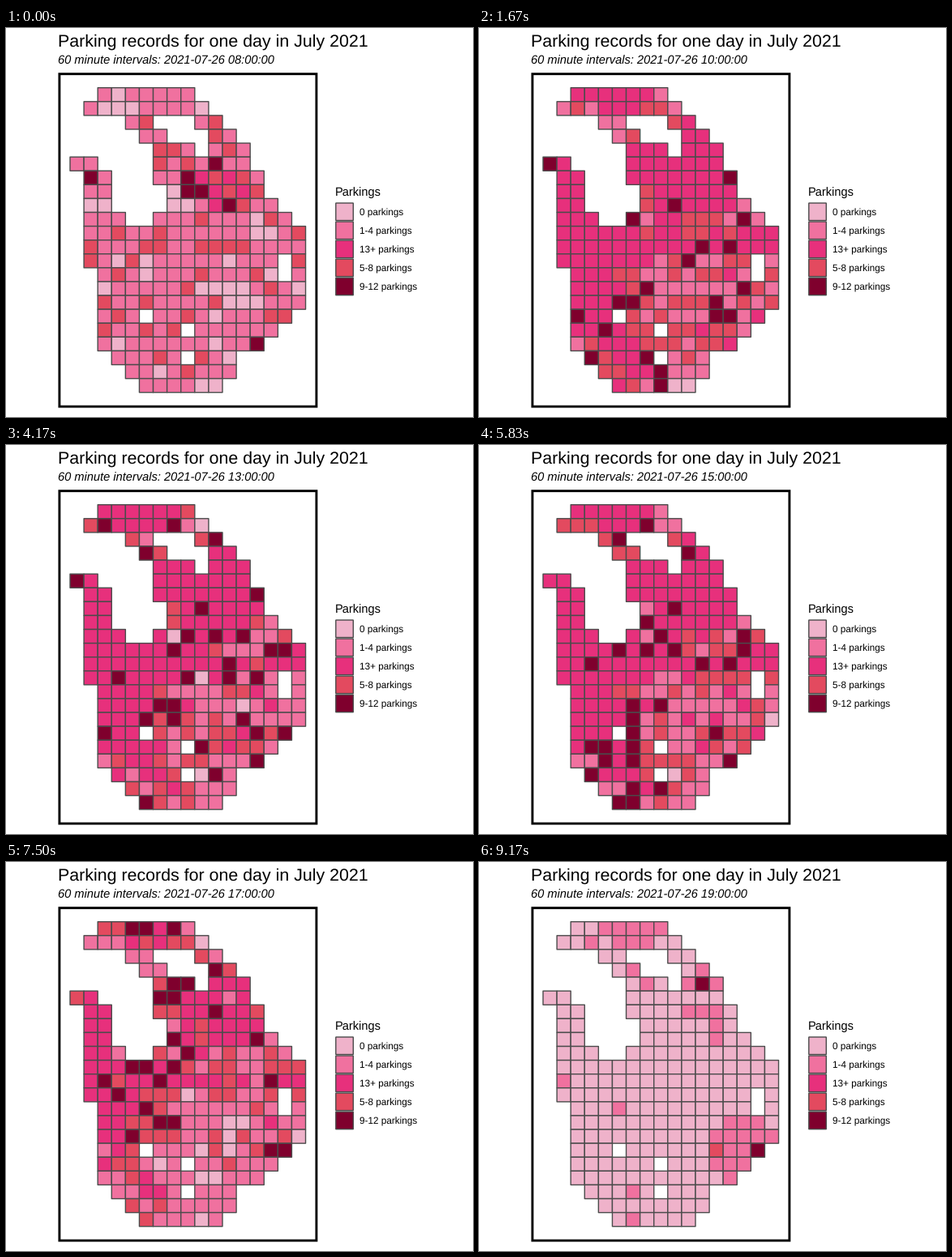
Animation, 576 px wide and 480 px high, one loop 10 s. Source, as a matplotlib script:

```python
import numpy as np
import matplotlib.pyplot as plt
from matplotlib.animation import FuncAnimation
from matplotlib.collections import PatchCollection
from matplotlib.patches import Rectangle

plt.rcParams["text.hinting"] = "none"

WIDTH, HEIGHT, DPI = 576, 480, 96
HOURS = range(8, 20)
FRAMES, INTERVAL = 200, 50

LEFT, TOP, CELL = 79.0, 73.7, 17.09
ROWS, COLS = 22, 17
EDGE = "#4b4b4b"

LIMITS = [1, 5, 9, 13]
COLORS = np.array(["#efb2ca", "#f0719f", "#e34a5f", "#7f002d", "#e7307c"])
LEGEND = [("0", 0), ("1-4", 1), ("13+", 4), ("5-8", 2), ("9-12", 3)]

# Corners (row, column) of the west and east outline.
WEST = [(0, 2), (1, 1), (2, 4), (4, 6), (5, 0), (6, 1), (12, 1), (13, 2),
        (18, 2), (21, 5)]
EAST = [(0, 8), (4, 12), (7, 13), (8, 14), (10, 16), (15, 16), (18, 13),
        (19, 11), (20, 11), (21, 10)]
# Water inside the outline: row, column, columns, rows.
WATER = [(2, 6, 3, 1), (3, 7, 3, 1), (4, 9, 1, 1), (5, 2, 4, 1), (6, 3, 3, 3),
         (7, 6, 1, 2), (9, 4, 2, 1), (12, 15, 1, 2), (16, 5, 1, 1),
         (17, 8, 1, 1), (19, 8, 1, 1)]

row, col = np.indices((ROWS, COLS))


def hotspot(r, c, height, width):
    """Flat-topped bump around a cell, falling off at the given half sizes."""
    distance = ((row - r) / height) ** 2 + ((col - c) / width) ** 2
    return np.exp(-distance ** 2)


# Expected parkings per cell at the start, middle and end of the day.
MORNING = 2.6 + 15 * hotspot(6.7, 10, 1.5, 2)
DAY = (5.5 + 45 * hotspot(9.5, 2.2, 6, 3.6) + 45 * hotspot(6, 10, 2.8, 3.6)
       + 30 * hotspot(0.5, 3.8, 1, 2.8) + 14 * hotspot(11, 8, 1.2, 3)
       + 18 * hotspot(11, 14.5, 1, 2.2) + 12 * hotspot(19, 5, 1.8, 1.8))
EVENING = (0.04 + 4 * hotspot(15.7, 14, 2, 2.2) + 2 * hotspot(0.4, 6, 1, 4)
           + 2 * hotspot(4, 11.5, 2.8, 1.4))
TEXTURE = np.exp(0.65 * np.random.default_rng(7).normal(size=(ROWS, COLS)))


def levels_at(hour):
    morning = np.interp(hour, [8, 9], [1, 0])
    day = np.interp(hour, [8, 9, 15, 19], [0, 1, 1, 0])
    evening = np.interp(hour, [15, 19], [0, 1])
    rate = morning * MORNING + day * DAY + evening * EVENING
    parkings = np.random.default_rng(hour).poisson(rate * TEXTURE)
    return np.digitize(parkings, LIMITS)


def outline(corners):
    return np.rint(np.interp(row, *zip(*corners)))


mask = (col >= outline(WEST)) & (col <= outline(EAST))
for r, c, columns, rows in WATER:
    mask[r:r + rows, c:c + columns] = False

fig = plt.figure(figsize=(WIDTH / DPI, HEIGHT / DPI), dpi=DPI,
                 facecolor="white")
ax = fig.add_axes([0, 0, 1, 1])
ax.set(xlim=(0, WIDTH), ylim=(HEIGHT, 0))
ax.axis("off")


def px(value):
    return value * 72 / DPI


def label(x, y, text, points, **style):
    return ax.text(x, y, text, fontsize=points, family="Liberation Sans",
                   color="black", va="baseline", **style)


label(64, 23, "Parking records for one day in July 2021", 16)
subtitle = label(64.3, 45.2, "", 11, style="italic")
ax.add_patch(Rectangle((65.9, 56.7), 317, 410.4, fill=False, ec="black",
                       lw=px(2.9), joinstyle="miter", snap=False))

cells = PatchCollection(
    [Rectangle((LEFT + c * CELL, TOP + r * CELL), CELL, CELL)
     for r, c in np.argwhere(mask)],
    edgecolor=EDGE, linewidth=px(1.4), snap=False)
ax.add_collection(cells)

label(406, 207, "Parkings", 11)
for i, (name, level) in enumerate(LEGEND):
    y = 216 + i * 23.04
    ax.add_patch(Rectangle((406.8, y), 21.5, 21.5, fc=COLORS[level], ec=EDGE,
                           lw=px(1.4), snap=False))
    label(436, y + 15.1, f"{name} parkings", 8.8)


def draw(frame):
    # An hour begins in the frame that contains its starting moment.
    hour = HOURS[((frame + 1) * len(HOURS) - 1) // FRAMES]
    subtitle.set_text(f"60 minute intervals: 2021-07-26 {hour:02d}:00:00")
    cells.set_facecolor(COLORS[levels_at(hour)[mask]])
    return cells, subtitle


animation = FuncAnimation(fig, draw, frames=FRAMES, interval=INTERVAL,
                          repeat=True)
plt.show()
```
